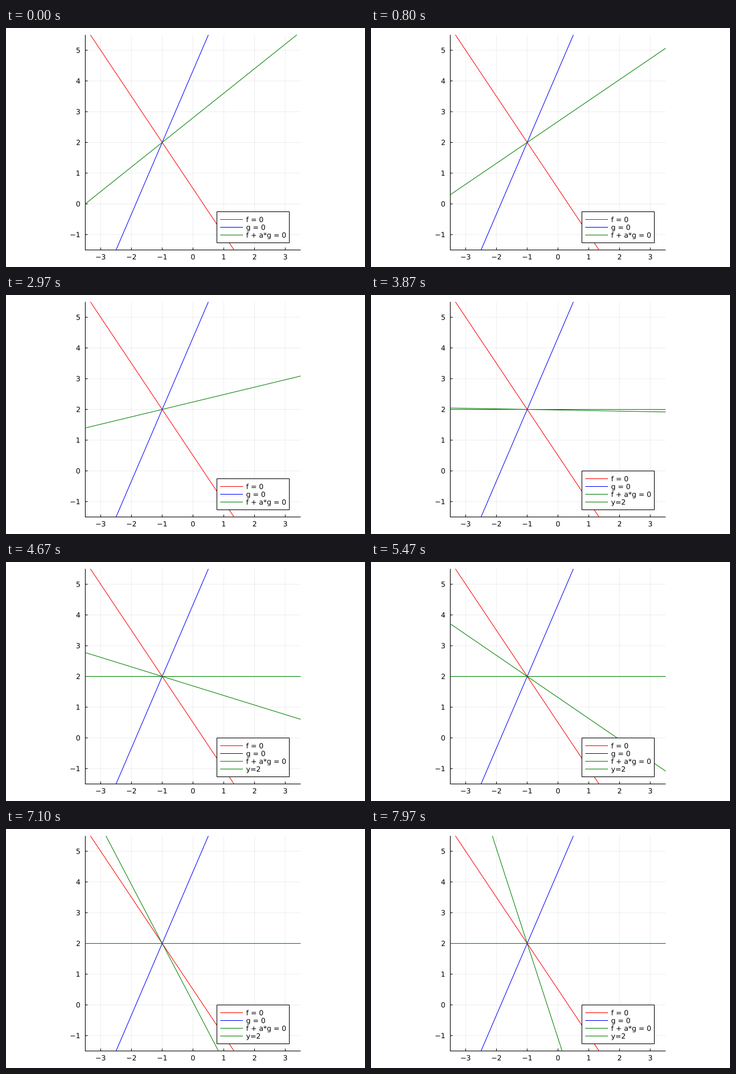
Animation, 600 px wide and 400 px high, one loop 8 s. Source, as a matplotlib script:

```python
import matplotlib.pyplot as plt
from matplotlib.animation import FuncAnimation
from matplotlib.patches import PathPatch, Rectangle
from matplotlib.textpath import TextPath
from matplotlib.transforms import Affine2D

FRAMES, LOOP_MS = 240, 8000
W, H, DPI = 600, 400, 100
PX = 72 / DPI
LEFT, TOP, SIDE = 132.5, 11.5, 360.0
X0, X1, Y0, Y1 = -3.5, 3.5, -1.5, 5.5
UNIT = SIDE / (X1 - X0)
RIGHT, BOTTOM = LEFT + SIDE, TOP + SIDE
CX, CY = -1, 2          # common point of all lines
BOX_L, BOX_R, BOX_B, ROW = 352.5, 473.5, 359.5, 13
FONT = 11.8             # pixels
DROP = 4.3              # from the middle of a digit to the baseline

plt.rcParams["font.family"] = "DejaVu Sans"

fig = plt.figure(figsize=(W / DPI, H / DPI), dpi=DPI, facecolor="white")
ax = fig.add_axes([0, 0, 1, 1])
ax.set_xlim(0, W)
ax.set_ylim(H, 0)
ax.axis("off")


def px(x):
    return LEFT + (x - X0) * UNIT


def py(y):
    return BOTTOM - (y - Y0) * UNIT


def stroke(xs, ys, color="black", z=2, **kw):
    return ax.plot(xs, ys, color=color, lw=PX, zorder=z, snap=False,
                   solid_capstyle="butt", **kw)[0]


def place(patch, x, y):
    patch.set_transform(Affine2D().scale(1, -1).translate(x, y) + ax.transData)


def write(s, x, y, align=0.0, z=2):
    """Unhinted text; align is 0 for left, 0.5 for centre, 1 for right."""
    path = TextPath((0, 0), s, size=FONT)
    ink = path.get_extents()
    patch = PathPatch(path, fc="black", lw=0, zorder=z, snap=False)
    ax.add_artist(patch)
    place(patch, x - align * (ink.x0 + ink.x1), y)
    return patch


def label(n):
    return str(n).replace("-", "\u2212")


def segment(dx, dy):
    """Pixel ends of the line through the common point, cut to the plot."""
    lo, hi = -1e9, 1e9
    for c, d, a, b in ((CX, dx, X0, X1), (CY, dy, Y0, Y1)):
        if abs(d) > 1e-12:
            t0, t1 = sorted(((a - c) / d, (b - c) / d))
            lo, hi = max(lo, t0), min(hi, t1)
    return ([px(CX + lo * dx), px(CX + hi * dx)],
            [py(CY + lo * dy), py(CY + hi * dy)])


# grid, ticks and axes
for v in range(-3, 4):
    stroke([px(v)] * 2, [TOP, BOTTOM], alpha=0.065, z=1)
    stroke([px(v)] * 2, [BOTTOM, BOTTOM - 4], z=1.5)
    write(label(v), px(v), 387.3, 0.5)
for v in range(-1, 6):
    stroke([LEFT, RIGHT], [py(v)] * 2, alpha=0.065, z=1)
    stroke([LEFT, LEFT + 4], [py(v)] * 2, z=1.5)
    write(label(v), 124.3, py(v) + DROP, 1)
stroke([LEFT, LEFT], [TOP, BOTTOM + 0.5], z=1.5)
stroke([LEFT - 0.5, RIGHT], [BOTTOM, BOTTOM], z=1.5)

# f: 3x + 2y - 1, g: 7x - 3y + 13
stroke(*segment(2, -3), "red", z=3)
stroke(*segment(3, 7), "blue", z=4)
mix = stroke([], [], "green", z=5)
level = stroke(*segment(1, 0), "green", z=6)

# legend
box = ax.add_patch(Rectangle((BOX_L, BOX_B), 1, 1, fc="white", ec="black",
                             lw=PX, zorder=7, snap=False))
entries = []
for name, color in (("f = 0", "red"), ("g = 0", "blue"),
                    ("f + a*g = 0", "green"), ("y=2", "green")):
    key = stroke([358, 396], [0, 0], color, z=8)
    entries.append((key, write(name, 0, 0, z=8)))


def draw(n):
    a = -1 + 0.005 * n
    mix.set_data(*segment(2 - 3 * a, -(3 + 7 * a)))
    crossed = a > -3 / 7
    level.set_visible(crossed)
    rows = 4 if crossed else 3
    top = BOX_B - ROW * (rows + 1)
    box.set_bounds(BOX_L, top, BOX_R - BOX_L, BOX_B - top)
    for i, (key, text) in enumerate(entries):
        y = top + ROW * (i + 1)
        key.set_ydata([y, y])
        place(text, 401.3, y + DROP)
        key.set_visible(i < rows)
        text.set_visible(i < rows)
    return [mix, level, box]


anim = FuncAnimation(fig, draw, frames=FRAMES, interval=LOOP_MS / FRAMES,
                     init_func=lambda: draw(0), repeat=True, repeat_delay=0,
                     blit=False)
plt.show()
```
